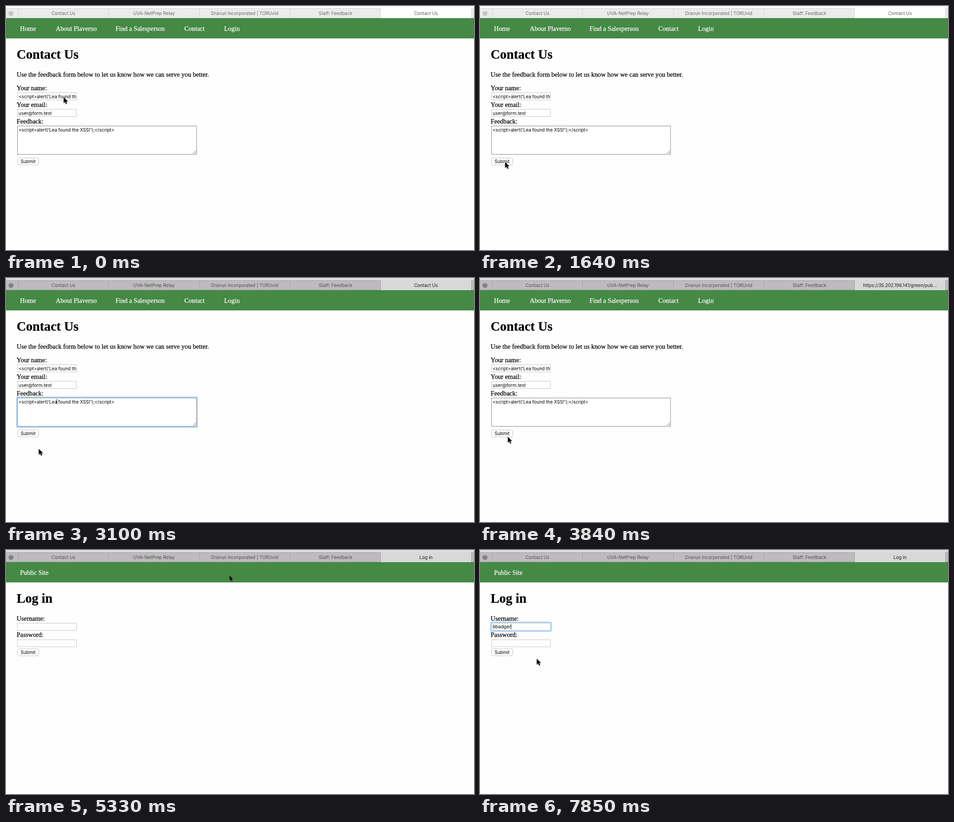
An HTML page for the animation above (8 s loop, 1034x542 px).

```html
<!DOCTYPE html>
<html lang="en">
<head>
<meta charset="utf-8">
<title>Feedback form</title>
<style>
  html, body { margin: 0; width: 100%; height: 100%; overflow: hidden; background: #fefefe; }
  svg {
    display: block; width: 1034px; height: 542px;
    --strip: #fafafa; --tab: #ebebeb; --current: #fefefe; --line: #d2d2d2;
    --label: #6a6a6a; --title: #5c5c5c; --pin: #c4c4c4;
  }
  svg.active {
    --strip: #dcdbdc; --tab: #bdbbbd; --current: #d9d8d9; --line: #a3a1a3;
    --label: #535253; --title: #1a1a1a; --pin: #858385;
  }
  text { font: 14.4px "Liberation Serif", serif; white-space: pre; stroke: #000; stroke-width: .25px; }
  .heading { font-size: 28.8px; font-weight: bold; }
  .nav text { fill: #fff; stroke: #fff; }
  .ui, .tabs text { font: 10px Inter, Roboto, sans-serif; stroke: none; }
  .tabs text { text-anchor: middle; fill: var(--label); }
  .tabs #title { fill: var(--title); }
  .field { fill: #fff; stroke: #c3c3c3; }
  .area { fill: #fff; stroke: #858585; }
  .ring { fill: none; stroke: #b8d8f9; stroke-width: 3; }
  .button { --face: #fff; --edge: #c2c2c2; --ink: #000; }
  .button.pressed { --face: #3f8ef5; --edge: #2a6fd6; --ink: #fff; }
  #arrow { filter: drop-shadow(0 1px 1px #0005); }
</style>
</head>
<body>
<svg id="stage" viewBox="0 0 1034 542">
  <defs>
    <g id="submit">
      <rect x="25.5" y=".5" width="47" height="15.5" rx="3.5" style="fill:var(--face);stroke:var(--edge)"/>
      <text class="ui" x="32.3" y="12" style="fill:var(--ink)">Submit</text>
    </g>
  </defs>

  <g class="tabs">
    <rect width="1034" height="6" style="fill:var(--strip)"/>
    <rect y="5" width="1034" height="22" style="fill:var(--tab)"/>
    <path d="M0 5.5H1034M0 26.5H1034M27.5 5V27M226.5 5V27M427.5 5V27M627.5 5V27M827.5 5V27M1028.5 5V27" style="stroke:var(--line)"/>
    <rect x="828" y="5" width="200" height="22" style="fill:var(--current)"/>
    <circle cx="11" cy="16.5" r="5.5" style="fill:var(--pin)"/>
    <text x="127" y="20">Contact Us</text>
    <text x="327" y="20">UVA-NetPrep Relay</text>
    <text x="527.5" y="20">Dravun Incorporated | TORUvid</text>
    <text x="728" y="20">Staff: Feedback</text>
    <text id="title" x="928" y="20"></text>
  </g>

  <rect y="27" width="1034" height="45" fill="#458945"/>
  <g class="nav" id="siteNav">
    <text x="31" y="55">Home</text>
    <text x="110" y="55">About Plaverno</text>
    <text x="242" y="55">Find a Salesperson</text>
    <text x="394" y="55">Contact</text>
    <text x="482" y="55">Login</text>
  </g>

  <g id="contact">
    <text class="heading" x="23.5" y="117">Contact Us</text>
    <text x="23.5" y="157">Use the feedback form below to let us know how we can serve you better.</text>
    <text x="23.5" y="187">Your name:</text>
    <rect class="field" x="25.5" y="192.5" width="130" height="16"/>
    <text class="ui" x="28" y="205">&lt;script>alert('Lea found th</text>
    <text x="23.5" y="224">Your email:</text>
    <rect class="field" x="25.5" y="229.5" width="130" height="16"/>
    <text class="ui" x="28" y="242">user@form.test</text>
    <text x="23.5" y="261">Feedback:</text>
    <rect class="ring" id="areaRing" x="23.5" y="264.5" width="399" height="67" rx="2"/>
    <rect class="area" x="25.5" y="266.5" width="395.5" height="63"/>
    <text class="ui" x="28" y="279">&lt;script>alert('Lea found the XSS!');&lt;/script></text>
    <path d="M413 328l7-7M417 328l3-3" stroke="#666"/>
    <rect id="areaCaret" x="112" y="269" width="1" height="11"/>
    <use href="#submit" y="337" class="button" id="send"/>
  </g>

  <g id="received">
    <text class="heading" x="23.5" y="117">Feedback Received</text>
    <text x="23.5" y="157">Thank you for submitting feedback. We hope to be able to use it to serve you</text>
    <text x="23.5" y="173">better.</text>
  </g>

  <g id="login">
    <g class="nav"><text x="31" y="55">Public Site</text></g>
    <text class="heading" x="23.5" y="117">Log in</text>
    <text x="23.5" y="157">Username:</text>
    <rect class="ring" id="userRing" x="23.5" y="160.5" width="134" height="20" rx="2"/>
    <rect class="field" x="25.5" y="162.5" width="130" height="16"/>
    <text class="ui" id="user" x="28" y="174"></text>
    <rect id="userCaret" y="165" width="1" height="11"/>
    <text x="23.5" y="193">Password:</text>
    <rect class="field" x="25.5" y="199.5" width="130" height="15.5"/>
    <use href="#submit" y="219" class="button"/>
  </g>

  <path id="arrow" d="M.5 .5V13.5l3-2.8 2.1 4.9 2.3-1-2.1-4.7H9.8z" stroke="#fff" stroke-width="1" paint-order="stroke"/>
  <path id="beam" d="M-3-7Q0-7 0-5V5Q0 7-3 7M3-7Q0-7 0-5M0 5Q0 7 3 7M-2 2.5H2" fill="none" stroke="#222"/>
</svg>
<script>
const LOOP = 8000;
const $ = id => document.getElementById(id);
const show = (id, on) => { $(id).style.display = on ? '' : 'none'; };
const latest = (steps, t) => steps.findLast(step => step[0] <= t);

const URL_TITLE = 'https://35.202.196.141/green/pub...';
const titles = [
  [0, 'Contact Us'], [3840, URL_TITLE], [4290, 'Feedback Received'],
  [5180, URL_TITLE], [5330, 'Log in']
];
const pages = [[0, 'contact'], [4290, 'received'], [5330, 'login']];
const typed = [[0, 0], [6670, 1], [6820, 2], [6970, 3], [7100, 4], [7400, 5], [7550, 7]];

// time, x, y, shape
const pointer = [
  [0, 127, 202], [150, 123, 201],
  [600, 128, 201, 'beam'], [750, 190, 240], [900, 236, 310, 'beam'], [1050, 232, 370],
  [1200, 180, 396], [1350, 110, 384], [1490, 70, 356], [1640, 55, 346],
  [2810, 58, 352], [2960, 66, 368], [3100, 72, 379], [3250, 67, 366], [3400, 61, 352],
  [3990, 110, 290], [4140, 240, 190], [4290, 370, 120], [4430, 440, 95],
  [4580, 459, 85], [4730, 480, 70], [4880, 493, 55],
  [5480, 400, 100], [5630, 260, 205], [5770, 165, 232], [5920, 140.5, 178.5, 'beam'],
  [7850, 125, 241]
];

function render(t) {
  const within = (from, to) => t >= from && t < to;
  $('stage').classList.toggle('active', t >= 1910);
  $('title').textContent = latest(titles, t)[1];

  const page = latest(pages, t)[1];
  for (const [, id] of pages) show(id, id === page);
  show('siteNav', page !== 'login');

  show('areaRing', within(1910, 3540));
  show('areaCaret', within(1910, 2360) || within(2810, 3250));
  $('send').classList.toggle('pressed', within(3540, 3840));

  show('userRing', t >= 6220);
  show('userCaret', t >= 6220);
  $('user').textContent = 'bbadger'.slice(0, latest(typed, t)[1]);
  if (page === 'login') $('userCaret').setAttribute('x', Math.round(28 + $('user').getComputedTextLength()));

  const [, x, y, shape = 'arrow'] = latest(pointer, t);
  for (const id of ['arrow', 'beam']) show(id, id === shape);
  $(shape).setAttribute('transform', `translate(${x} ${y})`);
}

const start = performance.now();
function tick() {
  render((performance.now() - start) % LOOP);
  requestAnimationFrame(tick);
}
tick();
</script>
</body>
</html>
```
